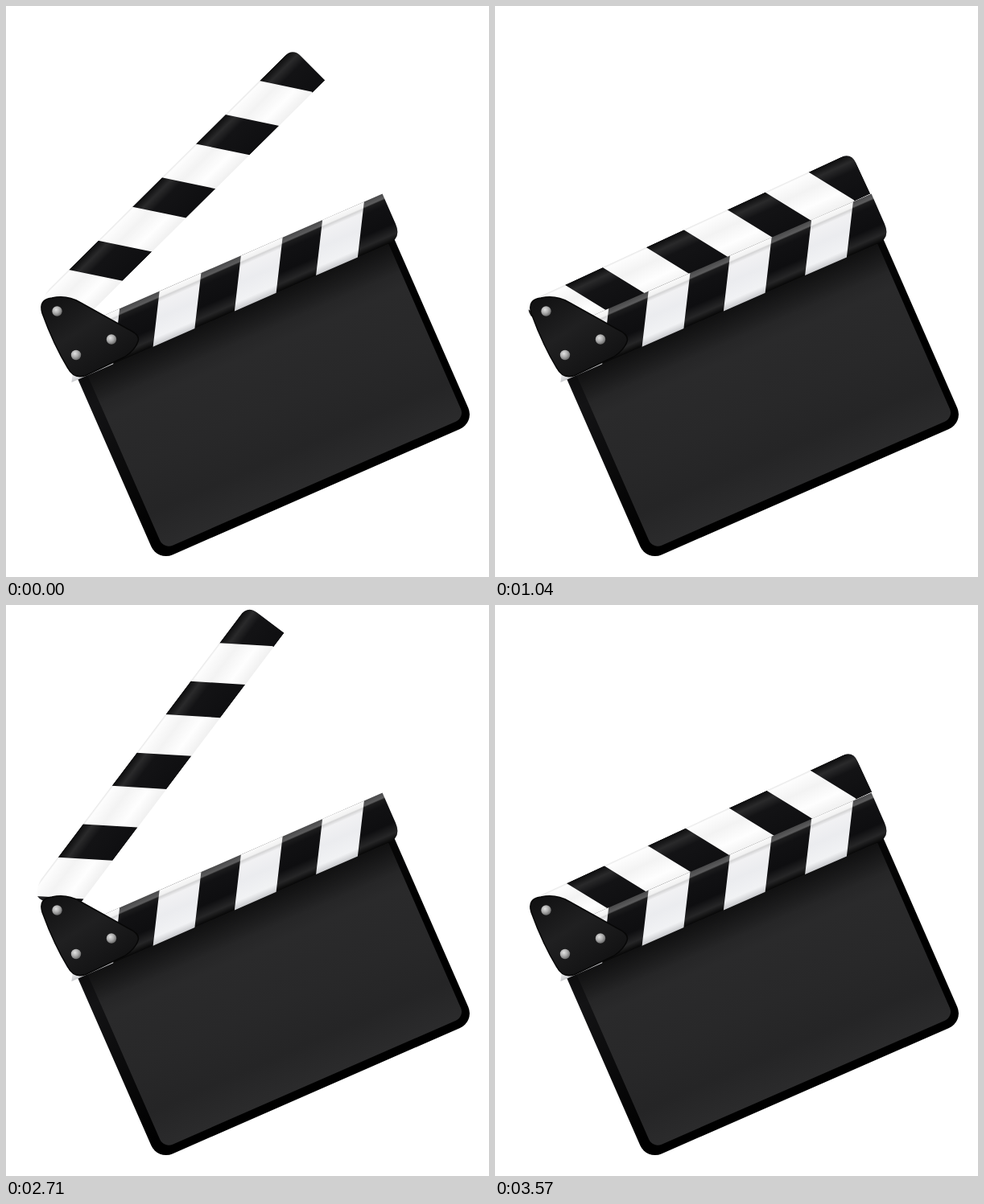
Write an HTML page that moves like this. It is 600 by 710 pixels and loops after 3.92 s.

```html
<!DOCTYPE html>
<html lang="en">
<head>
<meta charset="utf-8">
<title>Clapperboard</title>
<style>
  html, body { margin: 0; width: 100%; height: 100%; overflow: hidden; background: #fff; }
  svg { display: block; width: 100vw; height: 100vh; }
</style>
</head>
<body>
<svg viewBox="0 0 600 710">
  <defs>
    <linearGradient id="slate" x2="0" y2="1">
      <stop offset="0" stop-color="#1e1e1f"/>
      <stop offset=".25" stop-color="#2a2a2b"/>
      <stop offset=".55" stop-color="#282829"/>
      <stop offset=".8" stop-color="#252526"/>
      <stop offset="1" stop-color="#2b2b2c"/>
    </linearGradient>
    <linearGradient id="frame" x2=".4" y2=".7">
      <stop offset="0" stop-color="#18181a"/>
      <stop offset="1" stop-color="#000"/>
    </linearGradient>
    <linearGradient id="shadow" x2="0" y2="1">
      <stop offset="0" stop-opacity=".45"/>
      <stop offset="1" stop-opacity="0"/>
    </linearGradient>
    <linearGradient id="barWhite" x2="0" y2="1">
      <stop offset="0" stop-color="#fafafa"/>
      <stop offset=".1" stop-color="#f2f2f2"/>
      <stop offset=".13" stop-color="#d4d4d5"/>
      <stop offset=".2" stop-color="#f1f1f3"/>
      <stop offset=".5" stop-color="#ebecef"/>
      <stop offset=".85" stop-color="#f1f2f4"/>
      <stop offset="1" stop-color="#c9cacd"/>
    </linearGradient>
    <linearGradient id="barBlack" x2="0" y2="1">
      <stop offset="0" stop-color="#4a4a4b"/>
      <stop offset=".1" stop-color="#5c5c5d"/>
      <stop offset=".13" stop-color="#1c1c1d"/>
      <stop offset=".25" stop-color="#111113"/>
      <stop offset=".65" stop-color="#0e0e10"/>
      <stop offset=".86" stop-color="#262627"/>
      <stop offset="1" stop-color="#060606"/>
    </linearGradient>
    <linearGradient id="armWhite" x2="0" y2="1">
      <stop offset="0" stop-color="#e6e6e6"/>
      <stop offset=".04" stop-color="#fdfdfd"/>
      <stop offset=".35" stop-color="#f3f3f3"/>
      <stop offset=".7" stop-color="#fefefe"/>
      <stop offset="1" stop-color="#f0f0f0"/>
    </linearGradient>
    <linearGradient id="armBlack" x2="0" y2="1">
      <stop offset="0" stop-color="#0c0c0d"/>
      <stop offset=".1" stop-color="#1c1c1d"/>
      <stop offset=".18" stop-color="#2a2a2b"/>
      <stop offset=".38" stop-color="#131315"/>
      <stop offset="1" stop-color="#0f0f11"/>
    </linearGradient>
    <linearGradient id="plate" x2=".8" y2="1">
      <stop offset="0" stop-color="#0f0f10"/>
      <stop offset=".45" stop-color="#202021"/>
      <stop offset="1" stop-color="#0f0f10"/>
    </linearGradient>
    <radialGradient id="screw" cx=".38" cy=".35" r=".7">
      <stop offset="0" stop-color="#e2e2e2"/>
      <stop offset=".5" stop-color="#adadad"/>
      <stop offset="1" stop-color="#626262"/>
    </radialGradient>
    <path id="armShape" d="M-34 0H377Q392 0 392 15V56.8H-28L-50 25Q-57 16 -54 9Q-48 1 -34 0Z"/>
    <path id="barShape" d="M-75 -60H338V-19Q338 0 320 0H-100Z"/>
    <clipPath id="armClip"><use href="#armShape"/></clipPath>
  </defs>

  <g id="arm">
    <use href="#armShape" fill="url(#armWhite)"/>
    <g clip-path="url(#armClip)"><path id="armStripes" fill="url(#armBlack)"/></g>
  </g>

  <g transform="translate(182 424) rotate(-23.64)">
    <path d="M-101 -8H329V226.6a20 20 0 0 1 -20 20H-81a20 20 0 0 1 -20 -20Z" fill="url(#frame)"/>
    <path d="M-88 -2H320V224a12 12 0 0 1 -12 12H-76a12 12 0 0 1 -12 -12Z" fill="url(#slate)"/>
    <path d="M-100 0H328V38H-100Z" fill="url(#shadow)"/>
    <use href="#barShape" fill="url(#barBlack)"/>
    <path id="barStripes" fill="url(#barWhite)"/>
  </g>

  <path d="M45 382Q40 365 57 363Q76 359 92 368.5L152 402Q167 409 164 417Q161 427 148 436L99 459.5Q84 464 77 450.5Q59 421 45 382Z"
        fill="url(#plate)" stroke="#070707" stroke-width="1.5"/>
  <g fill="url(#screw)">
    <circle cx="63.5" cy="379.5" r="6.2"/>
    <circle cx="131" cy="414.5" r="6.2"/>
    <circle cx="87" cy="434" r="6.2"/>
  </g>
</svg>
<script>
  const byId = id => document.getElementById(id);

  // Slanted bands from y = top, repeated along x
  function stripes(count, first, step, width, slant, top, height) {
    let d = '';
    for (let i = 0; i < count; i++) {
      d += `M${first + i * step} ${top}h${width}l${slant} ${height}h${-width}z`;
    }
    return d;
  }
  // The last black band of the arm is wider and reaches past its tip
  byId('armStripes').setAttribute('d', stripes(5, -111.2, 111.2, 51.6, 37.6, 0, 56.8) + 'M370 0h30v56.8h-30z');
  byId('barStripes').setAttribute('d', stripes(4, -74.8, 110.5, 56.5, -35, -60, 60));

  // Each pose: end time in ms, then x, y and angle of the arm (none: arm hidden)
  const poses = [
    [770, 78, 328, -44.76],
    [1040, 71, 330, -53.03],
    [1940, 86.8, 346.8, -24.87],
    [2710, 78, 328, -44.76],
    [2980, 64.5, 313.7, -53.03],
    [3050],
    [3920, 88.8, 345.9, -24.87]
  ];
  const arm = byId('arm');
  const start = performance.now();

  function draw() {
    const t = (performance.now() - start) % 3920;
    const [, x, y, angle] = poses.find(p => t < p[0]);
    arm.setAttribute('visibility', x === undefined ? 'hidden' : 'visible');
    if (x !== undefined) arm.setAttribute('transform', `translate(${x} ${y}) rotate(${angle})`);
    requestAnimationFrame(draw);
  }
  draw();
</script>
</body>
</html>
```
